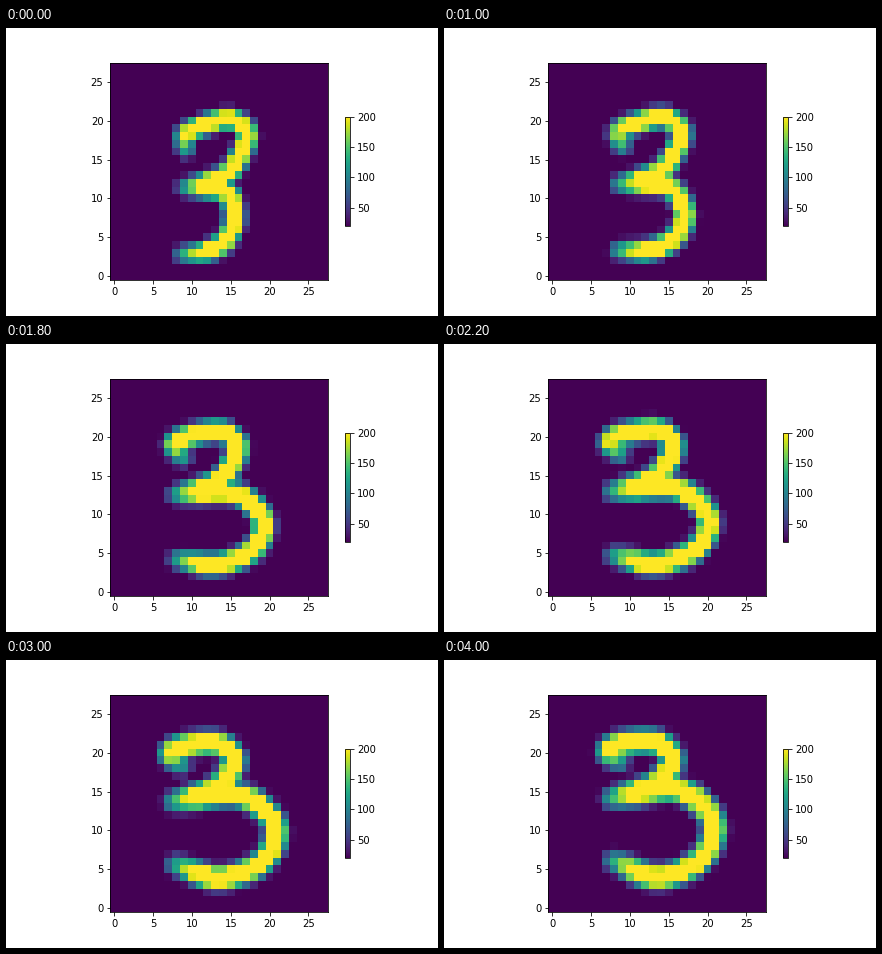
Animation of 432 by 288 pixels, one loop 4.2 s. Source, as a matplotlib script:

```python
import numpy as np
import matplotlib.pyplot as plt
from matplotlib.animation import FuncAnimation

WIDTH, HEIGHT, DPI = 432, 288, 72
FRAMES, INTERVAL = 21, 200
GRID = 28
BAR_TIP = 7  # index of the middle bar's left end, where the pen turns back

# Pen path: hook, arch, waist, bar tip, elbow, bowl, tail.
NARROW = np.array([
    (9.2, 16.3), (9.2, 18.2), (11.3, 19.3), (14.8, 20.2), (17, 18.6),
    (16.4, 15.9), (14.2, 12.9), (9.2, 11.4), (14.2, 10.9), (15.3, 9),
    (15.4, 6.8), (14.2, 4.5), (12, 3.2), (8.9, 2.8)])
ROUND = np.array([
    (8.6, 18.9), (7.2, 20.2), (9.3, 21.2), (13.3, 21.3), (15.4, 19.4),
    (14.6, 17.2), (12.6, 15.6), (7.7, 14.1), (15.5, 15.3), (19.6, 13),
    (20.8, 9.8), (18.8, 6), (13.5, 4), (8, 6.1)])

rows, cols = np.mgrid[:GRID, :GRID]


def smoothstep(u):
    u = np.clip(u, 0, 1)
    return u * u * (3 - 2 * u)


def spline(points, steps=14):
    """Sample a Catmull-Rom curve through the points."""
    padded = np.vstack([2 * points[0] - points[1], points,
                        2 * points[-1] - points[-2]])
    a, b, c, d = (padded[i:len(padded) - 3 + i, None] for i in range(4))
    t = np.linspace(0, 1, steps)[None, :, None]
    curve = (2 * b + (c - a) * t + (2 * a - 5 * b + 4 * c - d) * t ** 2
             + (3 * b - a - 3 * c + d) * t ** 3) / 2
    return curve.reshape(-1, 2)


def stroke(points, width):
    """Paint a soft stroke whose ink fades towards both ends."""
    curve = spline(points)
    steps = np.hypot(*np.diff(curve, axis=0).T)
    length = np.concatenate([[0], np.cumsum(steps)])
    from_end = np.minimum(length, length[-1] - length)
    ink = 0.45 + 0.55 * np.clip(from_end / 3.3, 0, 1)
    x, y = curve.T
    distance = np.hypot(cols[..., None] - x, rows[..., None] - y)
    return (275 * ink * np.exp(-(distance / width) ** 2.2)).max(axis=-1)


def digit(frame):
    t = frame / (FRAMES - 1)
    # The digit widens early and rises over the whole loop.
    progress = np.array([smoothstep(t / 0.7), smoothstep(t)])
    path = NARROW + (ROUND - NARROW) * progress
    width = 1.3 + 0.22 * progress[1]
    return np.maximum(stroke(path[:BAR_TIP + 1], width),
                      stroke(path[BAR_TIP:], width))


plt.rcParams.update({"font.family": "DejaVu Sans", "font.size": 10,
                     "figure.subplot.bottom": 0.125})
fig, ax = plt.subplots(figsize=(WIDTH / DPI, HEIGHT / DPI), dpi=DPI,
                       facecolor="white")
image = ax.imshow(digit(0), origin="lower", cmap="viridis", vmin=20, vmax=200,
                  interpolation="nearest")
ax.set_xticks(range(0, GRID, 5))
ax.set_yticks(range(0, GRID, 5))
fig.colorbar(image, ax=ax, shrink=0.5, ticks=[50, 100, 150, 200])


def update(frame):
    image.set_data(digit(frame))
    return [image]


anim = FuncAnimation(fig, update, frames=FRAMES, interval=INTERVAL,
                     repeat=True, repeat_delay=0, blit=False)
plt.show()
```
